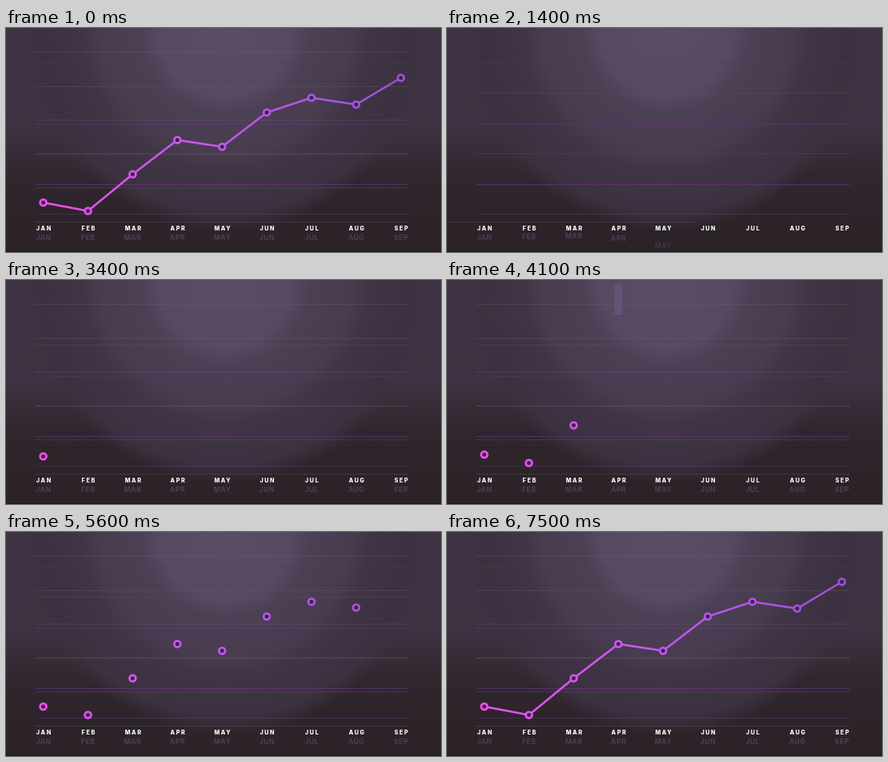
These frames come from a looping animation (544x281 px, 7.6 s). An HTML page:

```html
<!DOCTYPE html>
<html lang="en">
<head>
<meta charset="utf-8">
<title>Monthly line chart</title>
<style>
  html, body { margin: 0; width: 100%; height: 100%; overflow: hidden; background: #3a303f; }
  svg { display: block; width: 544px; height: 281px; }
  text { font-family: Inter, "Open Sans", sans-serif; text-anchor: middle; }
  .month { font-size: 7.2px; font-weight: 800; letter-spacing: 1.6px; fill: #fff; }
  .echo { font-size: 8.6px; font-weight: 700; letter-spacing: .5px; fill: #4d3e59; }
  .rule { stroke: url(#ruleInk); stroke-width: 1; }
  .soft { stroke: url(#ruleInk); stroke-width: 1; stroke-opacity: .6; }
  .faint { stroke: #6b5674; stroke-opacity: .28; stroke-width: 1; }
  .dots { stroke: #75697a; stroke-width: 1; }
  .line { fill: none; stroke: url(#ink); stroke-linejoin: round; }
  .ring { fill: #382743; stroke-width: 2.8; }
  .streak { fill: #8468ac; }
</style>
</head>
<body>
<svg id="stage" viewBox="0 0 544 281">
  <defs>
    <linearGradient id="base" x2="0" y2="1">
      <stop offset="0" stop-color="#3f3444"/>
      <stop offset=".46" stop-color="#3d3241"/>
      <stop offset=".66" stop-color="#30272e"/>
      <stop offset="1" stop-color="#2b2227"/>
    </linearGradient>
    <radialGradient id="glow" gradientUnits="userSpaceOnUse" cx="274" cy="2" r="252">
      <stop offset="0" stop-color="#5a4e67"/>
      <stop offset=".33" stop-color="#564a61"/>
      <stop offset=".42" stop-color="#4b4054"/>
      <stop offset=".62" stop-color="#483c4f"/>
      <stop offset=".71" stop-color="#403545"/>
      <stop offset=".91" stop-color="#3c3140"/>
      <stop offset="1" stop-color="#3c3140" stop-opacity="0"/>
    </radialGradient>
    <linearGradient id="ruleInk" gradientUnits="userSpaceOnUse" x1="37" x2="504">
      <stop offset="0" stop-color="#51316a"/>
      <stop offset=".5" stop-color="#663279"/>
      <stop offset="1" stop-color="#51316a"/>
    </linearGradient>
    <linearGradient id="ink" gradientUnits="userSpaceOnUse" x1="46" x2="494">
      <stop offset="0" stop-color="#f04df0"/>
      <stop offset=".4" stop-color="#c957f2"/>
      <stop offset="1" stop-color="#9c50db"/>
    </linearGradient>
  </defs>
  <rect width="544" height="281" fill="url(#base)"/>
  <rect width="544" height="281" fill="url(#glow)"/>
  <rect y="280" width="544" height="1" fill="#1b1519"/>
</svg>
<script>
const LOOP = 7600, STEP = 100;
const HOLDS = [2700, 4300, 5400, 5700];
const MONTHS = ['JAN', 'FEB', 'MAR', 'APR', 'MAY', 'JUN', 'JUL', 'AUG', 'SEP'];
const LEVELS = [219, 229.5, 183.5, 140.5, 149, 106, 87.5, 96, 62.5];
const stage = document.getElementById('stage');
const colX = k => 46.6 + k * 55.9;

function add(tag, attrs, text) {
  const el = document.createElementNS('http://www.w3.org/2000/svg', tag);
  for (const key in attrs) el.setAttribute(key, attrs[key]);
  if (text) el.textContent = text;
  return stage.appendChild(el);
}
const hLine = (y, cls) => add('line', { x1: 37, x2: 503.5, y1: y, y2: y, class: cls });
const show = (el, on) => { el.style.display = on ? '' : 'none'; };

// Linear interpolation through [time, value] pairs
function track(keys, t) {
  if (t <= keys[0][0]) return keys[0][1];
  for (let i = 1; i < keys.length; i++) {
    const [a, u] = keys[i - 1], [b, v] = keys[i];
    if (t < b) return u + (v - u) * (t - a) / (b - a);
  }
  return keys[keys.length - 1][1];
}
const easeInOut = p => p < .5 ? 4 * p ** 3 : 1 - (2 - 2 * p) ** 3 / 2;

[120.5, 196.5].forEach(y => hLine(y, 'rule'));
[44.5, 233.5].forEach(y => hLine(y, 'soft'));
const upper = hLine(81.5, 'faint');
hLine(157.5, 'faint');
const dots = [243.5, 200.5, 158.5, 115.5, 73.5, 30.5].map(y => hLine(y, 'dots'));

const echoes = MONTHS.map((m, k) =>
  add('text', { x: colX(k) + .25, y: 266.3, class: 'echo' }, m));
MONTHS.forEach((m, k) =>
  add('text', { x: colX(k) + 1.2, y: 254.1, class: 'month' }, m));

const d = 'M' + LEVELS.map((y, k) => `${colX(k)} ${y}`).join('L');
const thin = add('path', { d, class: 'line', 'stroke-width': 1.4 });
const thick = add('path', { d, class: 'line', 'stroke-width': 2.6 });
const total = thin.getTotalLength();

function inkAt(k) {
  const mix = (a, b, p) => a.map((v, i) => Math.round(v + (b[i] - v) * p));
  const p = k / 8, mid = [201, 87, 242];
  return `rgb(${p < .4 ? mix([240, 77, 240], mid, p / .4) : mix(mid, [156, 80, 219], (p - .4) / .6)})`;
}
const points = LEVELS.map((y, k) => ({
  y,
  ring: add('circle', { cx: colX(k), r: 3.9, class: 'ring', stroke: inkAt(k) }),
  streak: add('path', {
    d: 'M-5-19h10v38h-10zM-5-19h3v38h-3zM2-19h3v38h-3z', class: 'streak', 'fill-opacity': .26
  })
}));

function drawLine(path, length) {
  show(path, length > 0);
  path.setAttribute('stroke-dasharray', `${Math.max(0, length)} ${total + 20}`);
}

function render(t) {
  const done = t < 100 || t >= 7500;
  const settled = done || t >= 2600;
  show(upper, !done);

  dots.forEach((el, i) => {
    const age = settled ? 1000 : t - 1262 - i * 295;
    const p = easeInOut(Math.min(1, Math.max(0, age / 260)));
    const flying = age < 400;
    show(el, age > 40);
    el.setAttribute('transform', `translate(${-467 * (1 - p)} 0)`);
    el.setAttribute('stroke-dasharray', flying ? 'none' : '1.5 1.7');
    el.setAttribute('stroke-opacity', flying ? .25 : .6);
  });

  echoes.forEach((el, k) => {
    const age = settled ? 1000 : t - 530 - k * 200;
    const dy = track([[0, 13], [240, 1], [470, -2], [900, 0]], age);
    show(el, age > 0);
    el.setAttribute('transform', `translate(0 ${dy})`);
    el.setAttribute('opacity', Math.min(1, .4 + age / 250));
  });

  points.forEach(({ y, ring, streak }, k) => {
    const age = done ? 1000 : t - 3130 - k * 305;
    const cy = track([[0, -40], [160, y + 8], [340, y - 1.5], [500, y]], age);
    const falling = age > 0 && age < 140;
    show(streak, falling);
    show(ring, age >= 140);
    streak.setAttribute('transform', `translate(${colX(k)} ${cy})`);
    ring.setAttribute('cy', cy);
  });

  const p = done ? 1 : Math.max(0, (t - 6215) / 1285) ** 2;
  drawLine(thin, p * total);
  drawLine(thick, done ? total + 1 : p * total - 9);
}

const start = performance.now();
function tick() {
  let t = Math.floor((performance.now() - start) % LOOP / STEP) * STEP;
  if (HOLDS.includes(t)) t -= STEP;
  render(t);
  requestAnimationFrame(tick);
}
tick();
</script>
</body>
</html>
```
